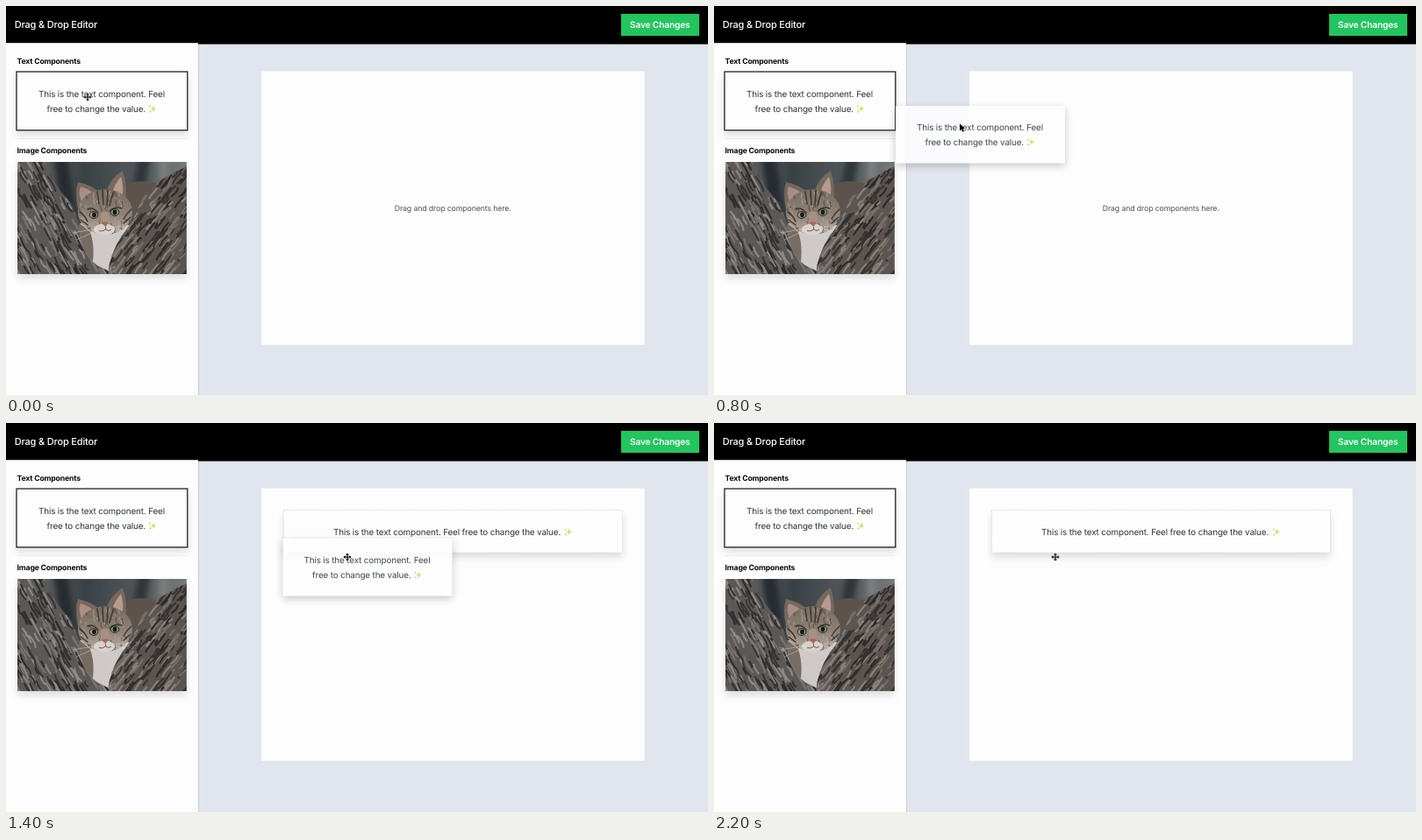
An HTML page for the animation above (2.3 s loop, 800 by 444 pixels).

```html
<!DOCTYPE html>
<html lang="en">
<head>
<meta charset="utf-8">
<title>Drag &amp; Drop Editor</title>
<style>
  html, body { margin: 0; width: 100%; height: 100%; overflow: hidden; background: #e1e6ee; }
  svg { display: block; width: 800px; height: 444px; }
  text {
    font-family: Inter, "Open Sans", sans-serif;
    letter-spacing: -.015em;
    text-rendering: geometricPrecision;
  }
  .title { font-size: 11px; font-weight: 500; fill: #fff; }
  .save { font-size: 10.2px; font-weight: 600; letter-spacing: -.017em; fill: #fff; }
  .head { font-size: 8.7px; font-weight: 700; letter-spacing: -.02em; fill: #0a0a0a; }
  .hint { font-size: 8.8px; letter-spacing: -.017em; fill: #4b5563; }
  .copy { font-size: 9.9px; fill: #2f3338; }
  .soft { filter: drop-shadow(0 5px 4px rgba(0, 0, 0, .12)); }
  .lift { filter: drop-shadow(0 3px 5px rgba(0, 0, 0, .24)); }

  .carry, .empty, .filled, .ghost, .arrow, .cross { animation: 2300ms step-end infinite; }
  .carry { animation-name: carry; }
  .empty { animation-name: empty; }
  .filled { animation-name: filled; }
  .ghost { animation-name: ghost; opacity: .9; }
  .arrow { animation-name: arrow; }
  .cross { animation-name: cross; }

  /* Offsets are measured from the point where the card is grabbed. */
  @keyframes carry {
    0% { transform: translate(6.5px, 7px); }
    8.69% { transform: translate(3px, 4px); }
    13.04% { transform: translate(0, 0); }
    17.39% { transform: translate(13px, 3px); }
    21.73% { transform: translate(54px, 11px); }
    26.08% { transform: translate(102px, 21px); }
    30.43% { transform: translate(147px, 30px); }
    34.78% { transform: translate(194px, 38px); }
    39.13% { transform: translate(250px, 48px); }
    43.47% { transform: translate(298.5px, 55px); }
    47.82%, 100% { transform: translate(302.5px, 56px); }
  }
  @keyframes empty { 0% { visibility: visible; } 39.13%, 100% { visibility: hidden; } }
  @keyframes filled { 0% { visibility: hidden; } 39.13%, 100% { visibility: visible; } }
  @keyframes ghost {
    0% { visibility: hidden; }
    17.39% { visibility: visible; }
    69.56%, 100% { visibility: hidden; }
  }
  @keyframes arrow {
    0% { visibility: hidden; }
    17.39% { visibility: visible; }
    39.13%, 100% { visibility: hidden; }
  }
  @keyframes cross {
    0% { visibility: visible; }
    17.39% { visibility: hidden; }
    39.13%, 100% { visibility: visible; }
  }
</style>
</head>
<body>
<svg viewBox="0 0 800 444">
  <defs>
    <path id="star" d="M0-4Q.6-.6 3.4 0Q.6.6 0 4Q-.6.6-3.4 0Q-.6-.6 0-4Z"/>
    <g id="sparkles" fill="#d9df7c">
      <use href="#star" x="1"/>
      <use href="#star" transform="translate(-3 -2.6) scale(.48)"/>
      <use href="#star" transform="translate(-2.6 3) scale(.5)"/>
    </g>
    <g id="words">
      <text class="copy" x="37" y="103.6">This is the text component. Feel</text>
      <text class="copy" x="46.5" y="121">free to change the value.</text>
      <use href="#sparkles" x="167" y="117.3"/>
    </g>
    <path id="trunk" d="M13 178H44Q54 206 76 226Q84 262 112 286L120 306H13Z"/>
    <path id="branch" d="M206 183Q176 196 156 215Q148 243 132 262Q118 284 116 306H206Z"/>
    <clipPath id="photoClip"><rect x="13" y="178" width="192.5" height="128"/></clipPath>
    <clipPath id="trunkClip"><use href="#trunk"/></clipPath>
    <clipPath id="branchClip"><use href="#branch"/></clipPath>
    <clipPath id="headClip"><ellipse cx="113" cy="235" rx="31" ry="26"/></clipPath>
    <linearGradient id="dusk">
      <stop offset="0" stop-color="#6c716f"/>
      <stop offset=".4" stop-color="#3a4145"/>
      <stop offset=".75" stop-color="#555b5d"/>
      <stop offset="1" stop-color="#777c7a"/>
    </linearGradient>
    <linearGradient id="fur" x2="0" y2="1">
      <stop offset="0" stop-color="#776b60"/>
      <stop offset=".55" stop-color="#8f8174"/>
      <stop offset="1" stop-color="#b9aea3"/>
    </linearGradient>
    <filter id="blur"><feGaussianBlur stdDeviation="3"/></filter>
    <filter id="grain"><feGaussianBlur stdDeviation=".6"/></filter>
  </defs>

  <rect width="800" height="444" fill="#e1e6ee"/>
  <rect x="219" y="42" width="1" height="402" fill="#c9cdd3"/>
  <rect width="800" height="43.6"/>
  <rect y="42.2" width="219" height="402" fill="#fefdfe"/>
  <text class="title" x="9.7" y="25.4">Drag &amp; Drop Editor</text>
  <rect x="701" y="9" width="89" height="25" fill="#22c55e"/>
  <text class="save" x="711" y="25.3">Save Changes</text>

  <text class="head" x="12.5" y="66">Text Components</text>
  <rect class="soft" x="12" y="75" width="194.8" height="66.8" fill="#fefdfe" stroke="#111" stroke-width="1.2"/>
  <use href="#words"/>
  <path d="M13 151.5H206" stroke="#e9e9ec"/>
  <text class="head" x="12.5" y="167.5">Image Components</text>

  <rect class="soft" x="13" y="178" width="192.5" height="128" fill="#55554f"/>
  <g clip-path="url(#photoClip)">
    <rect x="13" y="178" width="193" height="128" fill="url(#dusk)"/>
    <g filter="url(#blur)">
      <path d="M62 170L72 240" stroke="#262c30" stroke-width="16"/>
      <path d="M158 172L150 214" stroke="#2f363a" stroke-width="14"/>
      <path d="M180 172V200" stroke="#7b807f" stroke-width="10"/>
    </g>
    <path d="M132 205Q158 194 181 207L150 248Z" fill="#5b534c"/>
    <use href="#trunk" fill="#5c5856"/>
    <g clip-path="url(#trunkClip)"><g id="trunkBark" filter="url(#grain)"></g></g>
    <path d="M84 248Q82 280 104 296L118 303Q124 276 141 250Z" fill="#cfcac7"/>
    <path d="M84 248Q82 276 99 292Q101 272 96 258Z" fill="#776c62"/>
    <path d="M82 232Q78 212 82 201Q98 204 108 214Z" fill="#75685d"/>
    <path d="M86 224Q82 212 85 206Q95 209 101 215Z" fill="#a88f83"/>
    <path d="M114 212Q120 195 133 188Q139 205 136 226Z" fill="#75685d"/>
    <path d="M121 213Q125 201 131 195Q135 207 132 221Z" fill="#b79b8e"/>
    <ellipse cx="113" cy="235" rx="31" ry="26" fill="url(#fur)"/>
    <g clip-path="url(#headClip)"><g id="furLines" filter="url(#grain)"></g></g>
    <g fill="none" stroke="#3d3731" stroke-width="1.5" stroke-linecap="round">
      <path d="M104 212L106 226M110 210L111 227M116 210L115 227M122 213L118 228"/>
      <path d="M84 235Q89 238 93 246M85 244L93 250M143 232Q138 236 134 243M142 241L134 248"/>
      <path d="M93 232Q99 229 105 236M118 234Q125 228 132 231"/>
    </g>
    <path d="M108 237Q112 233 117 236L119 248L107 249Z" fill="#a59082"/>
    <ellipse cx="112" cy="255" rx="12" ry="6.5" fill="#d9d2cc"/>
    <g stroke="#25221f">
      <ellipse cx="100" cy="238.5" rx="4.8" ry="3.8" fill="#97a284"/>
      <ellipse cx="124" cy="235.5" rx="4.8" ry="3.8" fill="#86a085"/>
    </g>
    <ellipse cx="100.5" cy="238.3" rx="2.4" ry="2.9" fill="#171a19"/>
    <ellipse cx="124" cy="235.3" rx="2.4" ry="2.9" fill="#171a19"/>
    <path d="M108.5 247.5Q113 245.5 117 247L113.5 252Z" fill="#a5695d"/>
    <path d="M113.5 252V255Q110 258 106 256.5M113.5 255Q117 258 120 255" fill="none" stroke="#5f4e47" stroke-width=".9"/>
    <path d="M104 254L76 259M104 256L80 267M123 252L151 252M123 254L147 261" stroke="#eeebe8" stroke-width=".4"/>
    <use href="#branch" fill="#5b5450"/>
    <g clip-path="url(#branchClip)"><g id="branchBark" filter="url(#grain)"></g></g>
  </g>

  <g class="empty">
    <rect x="291" y="74.5" width="436.6" height="312.3" fill="#fefdfe"/>
    <text class="hint" x="442.7" y="234">Drag and drop components here.</text>
  </g>
  <g class="filled">
    <rect x="291" y="74.5" width="436.6" height="311" fill="#fefdfe"/>
    <rect class="soft" x="316.5" y="99.5" width="386" height="48.5" fill="#fefdfe" stroke="#d9d9de" stroke-width=".8" stroke-dasharray="2 1"/>
    <text class="copy" x="373" y="127.6">This is the text component. Feel free to change the value.</text>
    <use href="#sparkles" x="640.7" y="124.3"/>
  </g>

  <g class="carry">
    <g class="ghost">
      <rect class="lift" x="13" y="76" width="193" height="65.5" fill="#fefdfe"/>
      <use href="#words"/>
    </g>
    <path class="arrow" d="M86 96.2V104.4L88 102.6L89.4 105.7L90.9 105L89.5 102L92 101.8Z" stroke="#fff" stroke-width=".8" paint-order="stroke"/>
    <path class="cross" transform="translate(86.5 97)" stroke="#fff" stroke-width="1" paint-order="stroke"
      d="M0-4.6L2-2.4H.6V-.6H2.4V-2L4.6 0L2.4 2V.6H.6V2.4H2L0 4.6L-2 2.4H-.6V.6H-2.4V2L-4.6 0L-2.4-2V-.6H-.6V-2.4H-2Z"/>
  </g>
</svg>
<script>
  function seeded(seed) {
    return () => (seed = (seed * 16807) % 2147483647) / 2147483647;
  }

  // Scatters short, slightly crooked strokes of each colour over a box.
  function streaks(id, seed, count, [x, y, w, h], [dx, dy], width, colors) {
    const rand = seeded(seed);
    for (const color of colors) {
      let d = "";
      for (let i = 0; i < count; i++) {
        const len = .4 + rand();
        const bend = (rand() - .5) * 8;
        const ex = dx * len, ey = dy * len;
        d += `M${x + rand() * w} ${y + rand() * h}q${ex / 2 + bend} ${ey / 2} ${ex} ${ey}`;
      }
      const path = document.createElementNS("http://www.w3.org/2000/svg", "path");
      path.setAttribute("d", d);
      path.setAttribute("fill", "none");
      path.setAttribute("stroke", color);
      path.setAttribute("stroke-width", width);
      document.getElementById(id).append(path);
    }
  }

  streaks("trunkBark", 71, 75, [5, 165, 110, 140], [8, 15], 2, ["#8f8b89", "#2b2a2a", "#777472", "#353333"]);
  streaks("branchBark", 29, 80, [112, 175, 105, 130], [-10, 13], 2, ["#8b837e", "#2b2826", "#756d68", "#363230"]);
  streaks("furLines", 13, 45, [82, 206, 60, 50], [1, 5], .9, ["#4d463f", "#b0a498"]);
</script>
</body>
</html>
```
